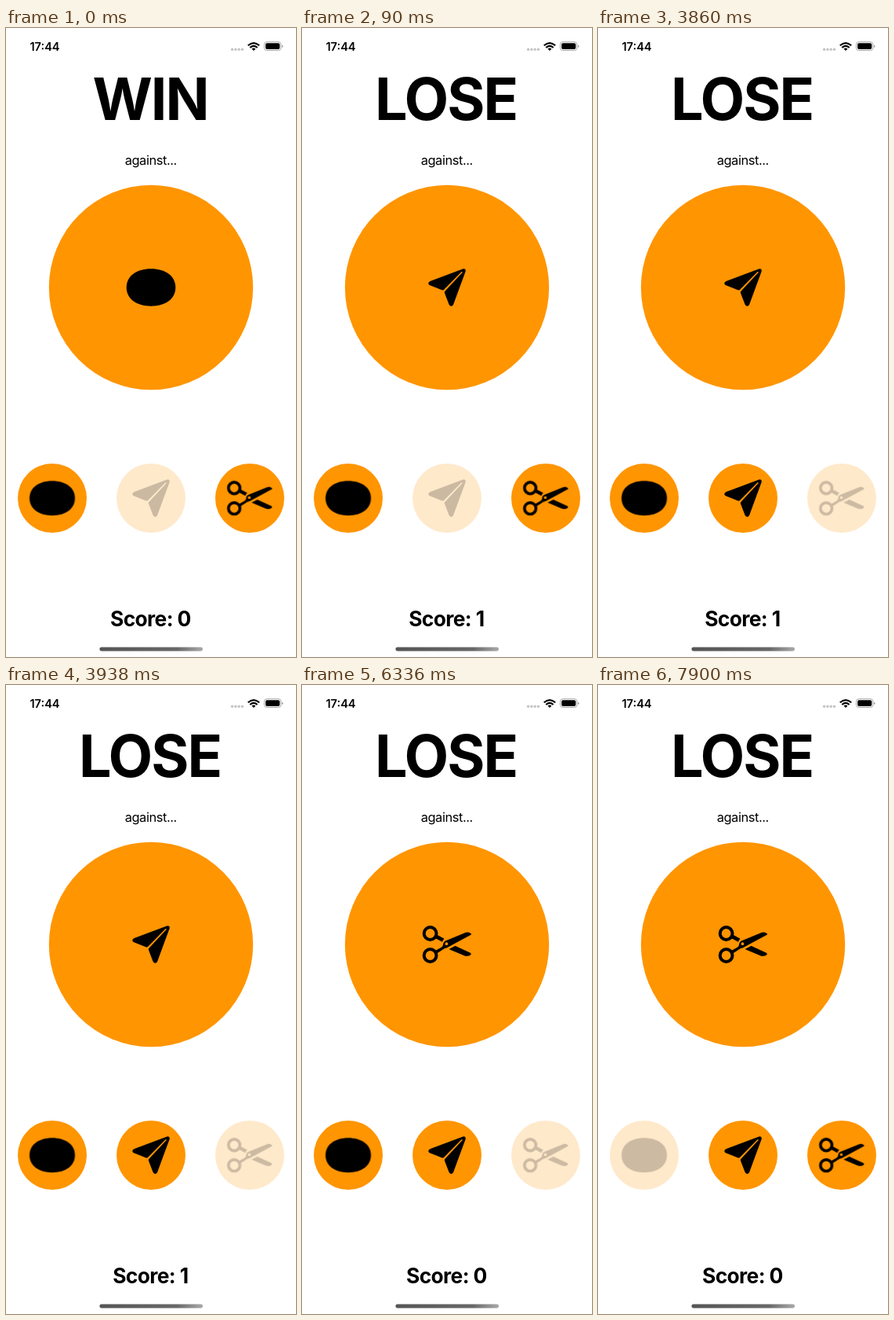
An HTML page that plays this animation: 370 by 800 pixels, repeating every 7.99 s.

```html
<!DOCTYPE html>
<html lang="en">
<head>
<meta charset="utf-8">
<title>Win or lose</title>
<style>
  html, body { margin: 0; width: 100%; height: 100%; overflow: hidden; background: #fff; }
  svg { display: block; width: 100%; height: 100%; }
  text { font-family: Inter, Roboto, sans-serif; text-anchor: middle; }
  .disc { fill: #ff9500; }
  .prompt { font-size: 73.6px; font-weight: 700; letter-spacing: -.027em; }
  .score { font-size: 26.4px; font-weight: 700; letter-spacing: -.024em; }
  .note { font-size: 16.4px; letter-spacing: -.025em; }
  .clock { font-size: 14.6px; font-weight: 600; }

  .timed, .button > * { animation: 7990ms step-end infinite; }
  .first { animation-name: first; }
  .rest { animation-name: rest; }
  .middle { animation-name: middle; }
  .outer { animation-name: outer; }
  .last { animation-name: last; }
  .rock > * { animation-name: press-rock; }
  .paper > * { animation-name: press-paper; }
  .scissors > * { animation-name: press-scissors; }

  /* Turns change at 90 and 3990 ms */
  @keyframes first { 0% { opacity: 1 } 1.126%, 100% { opacity: 0 } }
  @keyframes rest { 0% { opacity: 0 } 1.126%, 100% { opacity: 1 } }
  @keyframes middle { 0%, 49.937%, 100% { opacity: 0 } 1.126% { opacity: 1 } }
  @keyframes outer { 0%, 49.937%, 100% { opacity: 1 } 1.126% { opacity: 0 } }
  @keyframes last { 0% { opacity: 0 } 49.937%, 100% { opacity: 1 } }

  /* Presses begin at 0, 3860 and 7900 ms */
  @keyframes press-paper { 0% { opacity: .2 } 48.31%, 100% { opacity: 1 } }
  @keyframes press-scissors { 0%, 98.873%, 100% { opacity: 1 } 48.31% { opacity: .2 } }
  @keyframes press-rock { 0% { opacity: 1 } 98.873%, 100% { opacity: .2 } }
</style>
</head>
<body>
<svg viewBox="0 0 370 800">
  <defs>
    <path id="rock" d="M-31.3 0C-31.3 -14.5 -18.5 -23.7 0 -23.7S31.3 -14.5 31.3 0S18.5 23.7 0 23.7S-31.3 14.5 -31.3 0Z"/>
    <path id="paper" d="M20 -23.5L-21.5 -8Q-25.5 -5.8 -22.3 -3L-6.5 3.3Q-4.8 3.8 -3.6 2.6L18.6 -19.9Q20 -20.6 19.6 -19L-2.4 4.6Q-3.6 5.8 -3 7.3L2.6 21.8Q5 25.8 8 22L23.6 -20.2Q24.6 -24.6 20 -23.5Z"/>
    <g id="scissors">
      <g fill="none" stroke="#000" stroke-width="4">
        <circle cx="-21.4" cy="-14" r="7.9"/>
        <circle cx="-21.4" cy="14" r="7.9"/>
      </g>
      <path d="M-13 -12.5L-3.4 -7.2Q-5.6 -5.6 -6 -3.2L-15 -8Z"/>
      <path fill-rule="evenodd" d="M-15 8L-7 3.5Q-5 2 -5 0Q-4.5 -4 -1 -5L24 -15.2Q28 -16.5 31 -13.5Q31.2 -12.5 30 -12L3 2.5Q0 4.5 -3 5L-13 11.5ZM-2.5 -.8a1.9 1.9 0 1 0 3.8 0a1.9 1.9 0 1 0 -3.8 0Z"/>
      <path d="M2.5 6L10.5 1.8L30 10.7Q31.6 12 30 13.4Q26 16 21.5 14Z"/>
    </g>
    <linearGradient id="bar">
      <stop offset="0" stop-color="#555"/>
      <stop offset=".75" stop-color="#686868"/>
      <stop offset="1" stop-color="#aaa"/>
    </linearGradient>
  </defs>

  <text class="clock" x="49.5" y="28.7">17:44</text>
  <g fill="#c4c4c4">
    <circle cx="288.6" cy="27.3" r="1.7"/>
    <circle cx="292.9" cy="27.3" r="1.7"/>
    <circle cx="297.2" cy="27.3" r="1.7"/>
    <circle cx="301.5" cy="27.3" r="1.7"/>
  </g>
  <g fill="none" stroke="#000" stroke-width="2.2">
    <path d="M308.8 22.3Q316 15.8 323.2 22.3"/>
    <path d="M311.3 25Q316 20.8 320.7 25"/>
  </g>
  <path d="M313.5 26.4Q316 24.4 318.5 26.4L316 29Z"/>
  <rect x="329.5" y="17.7" width="21.4" height="10.8" rx="3.2" fill="none" stroke="#a6a6a6"/>
  <rect x="331.1" y="19.3" width="18.2" height="7.6" rx="1.9"/>
  <path d="M352 21.4q1.5 .5 1.5 1.8t-1.5 1.8z" fill="#a6a6a6"/>

  <g class="prompt">
    <text class="timed first" x="184" y="117">WIN</text>
    <text class="timed rest" x="183.6" y="117">LOSE</text>
  </g>
  <text class="note" x="184.8" y="173.8">against...</text>

  <g transform="translate(185 330)">
    <circle class="disc" r="130.2"/>
    <use class="timed first" href="#rock"/>
    <use class="timed middle" href="#paper"/>
    <use class="timed last" href="#scissors"/>
  </g>

  <g class="button rock" transform="translate(59 598)">
    <circle class="disc" r="44"/>
    <use href="#rock" transform="scale(.926)"/>
  </g>
  <g class="button paper" transform="translate(185 598)">
    <circle class="disc" r="44"/>
    <use href="#paper"/>
  </g>
  <g class="button scissors" transform="translate(311 598)">
    <circle class="disc" r="44"/>
    <use href="#scissors" transform="scale(.926)"/>
  </g>

  <g class="score">
    <text class="timed outer" x="184.3" y="761.2">Score: 0</text>
    <text class="timed middle" x="184.3" y="761.2">Score: 1</text>
  </g>
  <rect x="119.3" y="787.6" width="131.8" height="4.9" rx="2.45" fill="url(#bar)"/>
</svg>
</body>
</html>
```
